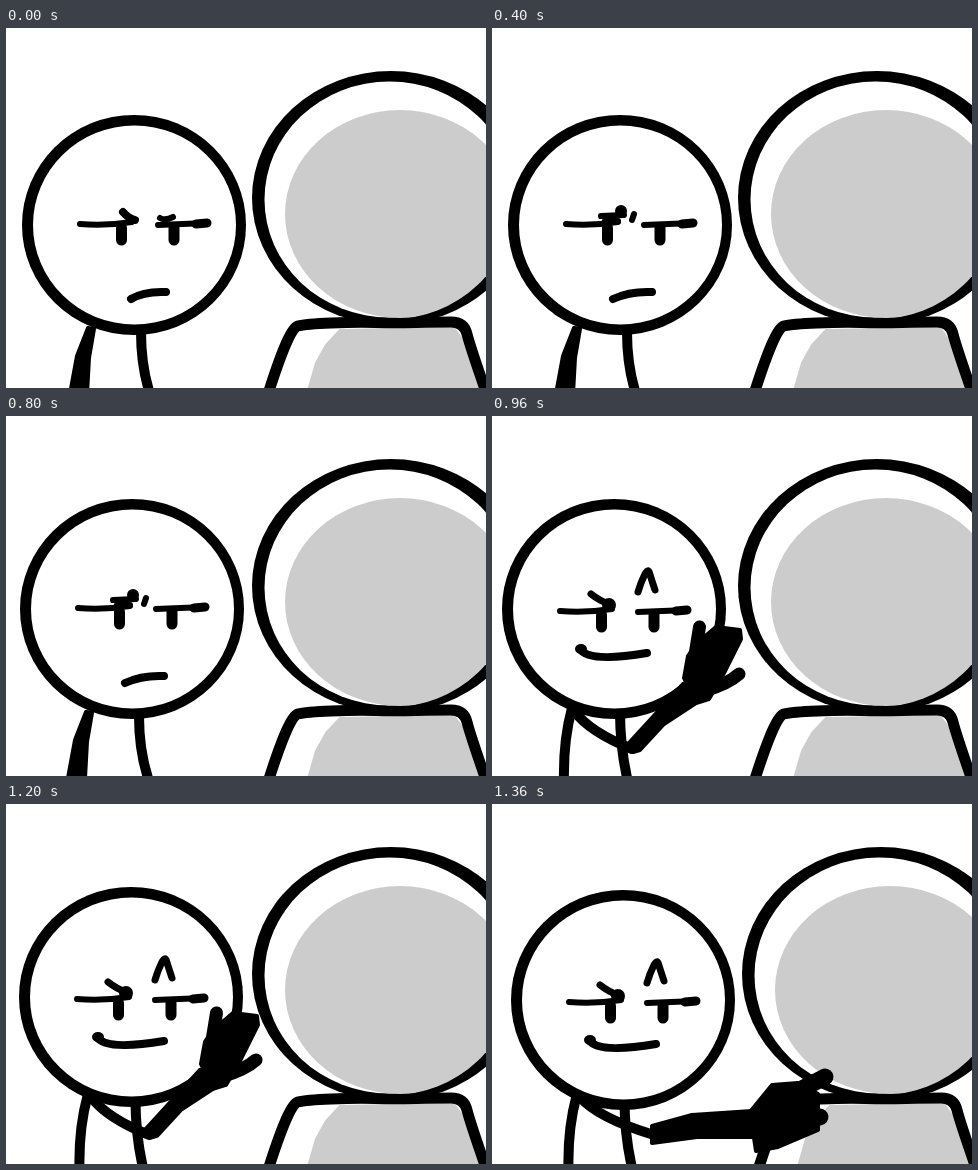
An HTML page that plays this animation: 480x360 px, repeating every 2.24 s.

```html
<!DOCTYPE html>
<html lang="en">
<head>
<meta charset="utf-8">
<title>Stick figures</title>
<style>
  html, body { margin: 0; width: 100%; height: 100%; overflow: hidden; background: #fff; }
  svg { display: block; width: 100%; height: 100%; }
</style>
</head>
<body>
<svg id="stage" viewBox="0 0 480 360"></svg>
<script>
const LOOP = 2240;
const GREY = '#ccc';
const stage = document.getElementById('stage');

function add(parent, tag, attrs = {}) {
  const node = document.createElementNS('http://www.w3.org/2000/svg', tag);
  for (const key in attrs) node.setAttribute(key, attrs[key]);
  return parent.appendChild(node);
}
const group = parent => add(parent, 'g');

// Smooth open path: each inner point steers a quadratic ending midway to the next.
function curve(text) {
  const pts = text.split(' ').map(p => p.split(',').map(Number));
  const last = pts.length - 1;
  let d = 'M' + pts[0];
  for (let i = 1; i < last; i++) {
    const end = i === last - 1 ? pts[last] : pts[i].map((v, k) => (v + pts[i + 1][k]) / 2);
    d += `Q${pts[i]} ${end}`;
  }
  return last === 1 ? d + 'L' + pts[1] : d;
}
const stroke = (parent, pts, width) => add(parent, 'path', {
  d: curve(pts), fill: 'none', stroke: '#000', 'stroke-width': width, 'stroke-linecap': 'round'
});
const solid = (parent, points, color = '#000', soft = 4) => add(parent, 'polygon', {
  points, fill: color, stroke: color, 'stroke-width': soft, 'stroke-linejoin': 'round'
});
const oval = (parent, cx, cy, rx, ry, fill = '#000') =>
  add(parent, 'ellipse', { cx, cy, rx, ry, fill });

// Small figure: bodies, head, faces
const bodies = { slack: group(stage), lively: group(stage) };
solid(bodies.slack, '82,300 88,301 83,330 81,366 64,366 71,328');
stroke(bodies.slack, '135,304 135,338 144,366', 10);
stroke(bodies.lively, '80,292 71,325 72,366', 10);
stroke(bodies.lively, '128,296 128,332 136,366', 10);

const head = group(stage);
oval(head, 128, 197, 112, 110);
oval(head, 128.5, 197, 101.5, 99.5, '#fff');

const faces = {};
function face(name, lidY) {
  const f = faces[name] = group(head);
  if (!lidY) return f;
  stroke(f, `74,${lidY} 100,${lidY + 2} 126,${lidY - 2}`, 6);
  stroke(f, `152,${lidY + 1} 201,${lidY - 1}`, 6);
  stroke(f, `190,${lidY} 201,${lidY - 1}`, 9);
  for (const x of [115.5, 168]) stroke(f, `${x},${lidY + 4} ${x},${lidY + 16}`, 11);
  return f;
}
const frown = (f, x) => stroke(f, `${x},271 138,263 160,264`, 8);

const bored = face('bored', 196);
stroke(bored, '117,184 122,190 129,192', 8);
stroke(bored, '154,190 159,193 167,189', 6);
frown(bored, 125);

const blink = face('blink');
stroke(blink, '91,200 96,212 118,212 128,199', 8);
stroke(blink, '117,190 124,195 133,195', 8);
stroke(blink, '155,205 164,217 184,205', 8);
stroke(blink, '157,197 168,191', 8);
frown(blink, 121);

const doubt = face('doubt', 196);
stroke(doubt, '109,188 132,187', 6);
stroke(doubt, '113,193 126,193', 6);
oval(doubt, 129, 183, 6, 6);
stroke(doubt, '142,186 140,192', 6);
frown(doubt, 121);

const smirk = face('smirk', 199);
stroke(smirk, '105,182 114,189 123,192', 7);
oval(smirk, 123, 193, 7, 7);
stroke(smirk, '152,180 155,170 162,156 165,166 169,178', 7);
stroke(smirk, '94,237 102,251 161,241', 8);
oval(smirk, 95, 237, 6, 5);

// Large figure seen from behind
const friend = group(stage);
solid(friend, '301,366 310,335 320,317 334,302 448,300 460,316 478,366', GREY, 2);
stroke(friend, '262,366 283,300 300,296 350,294 388,295 432,294 458,294 464,318 480,364', 11);
oval(friend, 385, 170, 139, 127);
oval(friend, 383.5, 171.5, 125, 118, '#fff');
const clip = add(add(friend, 'clipPath', { id: 'nape' }), 'ellipse', { cx: 383.5, cy: 172.5, rx: 125, ry: 119 });
oval(friend, 394, 186, 115, 104, GREY).setAttribute('clip-path', 'url(#nape)');

// Arm, raised or reaching across
const arms = { raised: group(stage), reach: group(stage) };
stroke(arms.raised, '83,296 98,316 140,333', 10);
solid(arms.raised, '191,268 136,328 141,336 148,334 172,308 204,287');
solid(arms.raised, '192,262 196,240 204,228 224,211 248,214 249,223 232,257 217,283 204,287');
stroke(arms.raised, '207.5,211 202,245', 13);
stroke(arms.raised, '247,258 236,268 212,275', 13);
stroke(arms.reach, '88,293 106,314 162,331', 10);
solid(arms.reach, '160,322 200,311 260,307 260,333 205,333 160,339');
solid(arms.reach, '258,308 280,281 306,279 326,290 326,326 286,343 264,347');
stroke(arms.reach, '333,273 300,290', 17);
stroke(arms.reach, '328,313 300,316', 17);

// Held poses: start, face, head offset, arm, push on the friend
const poses = [
  [0, 'bored', 0, 0],
  [320, 'blink', 0, 0],
  [400, 'doubt', 0, 0],
  [640, 'doubt', 2, 1],
  [800, 'doubt', -2, -4],
  [880, 'smirk', -7, -5, 'raised'],
  [960, 'smirk', -6, -4, 'raised'],
  [1040, 'smirk', -4, -4, 'raised'],
  [1200, 'smirk', -3, -4, 'raised'],
  [1280, 'smirk', 1, -2, 'reach', 2],
  [1360, 'smirk', 3, -1, 'reach', 4]
];

const move = (node, x, y) => node.setAttribute('transform', `translate(${x} ${y})`);
function show(set, name) {
  for (const key in set) set[key].style.display = key === name ? '' : 'none';
}

function draw(time) {
  const [, mood, x, y, arm, push = 0] = poses.findLast(([start]) => start <= time);
  const lean = x + 6;
  show(faces, mood);
  show(bodies, arm ? 'lively' : 'slack');
  show(arms, arm);
  move(head, x, y);
  move(bodies.slack, x, y);
  move(bodies.lively, lean / 2, 0);
  move(arms.raised, lean, -lean * .7);
  move(arms.reach, push - 4, 0);
  move(friend, push, 0);
}

const start = performance.now();
function tick() {
  draw((performance.now() - start) % LOOP);
  requestAnimationFrame(tick);
}
tick();
</script>
</body>
</html>
```
